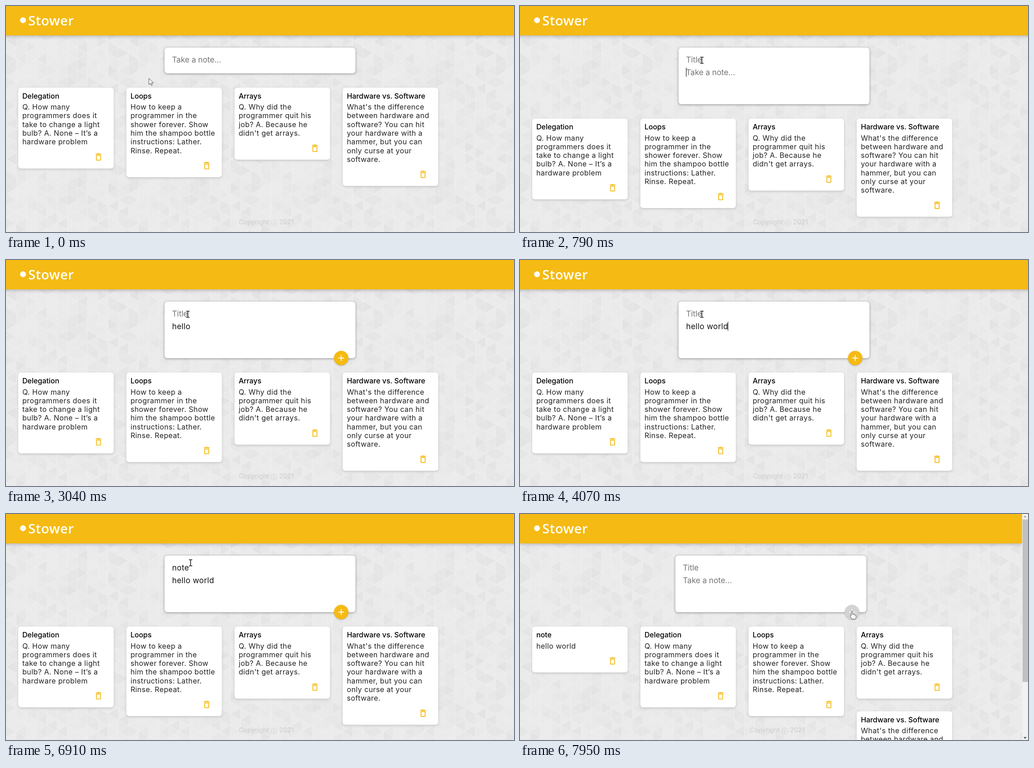
Recreate the animation shown at these times as an HTML page. Size 1120 by 500 pixels, loop 8000 ms.

```html
<!DOCTYPE html>
<html lang="en">
<head>
<meta charset="utf-8">
<title>Notes</title>
<style>
  html, body { margin: 0; width: 100%; height: 100%; overflow: hidden; background: #e9e9e9; }
  svg { display: block; width: 1120px; height: 500px; }
  text { font: 400 16px Inter, "Open Sans", sans-serif; letter-spacing: .025em; fill: #222; white-space: pre; }
  .brand { font: 600 29px "Open Sans", "Noto Sans", sans-serif; letter-spacing: .02em; fill: #fff; }
  .title { font-weight: 500; font-size: 15.9px; letter-spacing: 0; fill: #000; }
  .field { font-size: 17.3px; letter-spacing: .015em; fill: #111; }
  .hint { fill: #757575; letter-spacing: -.005em; }
  .foot { font-size: 14px; letter-spacing: .01em; fill: #ccc; text-anchor: middle; }
  .card { fill: #fff; filter: drop-shadow(0 2px 2.5px #c4c4c4); }
  .form { fill: #fff; filter: drop-shadow(0 1px 2.5px rgb(138, 137, 137)); }
  .bar { fill: #f5ba13; filter: drop-shadow(0 1px 4px rgba(0, 0, 0, .3)); }
</style>
</head>
<body>
<svg id="stage" viewBox="0 0 1120 500"></svg>
<script>
const LOOP = 8000, OPEN = 780, PRESS = 7790, ADD = 7950, BLINK = 530;
const GOLD = [245, 186, 19], GREY = [211, 211, 211];

const stage = document.getElementById('stage');
function el(tag, attrs, parent = stage, text) {
  const node = document.createElementNS('http://www.w3.org/2000/svg', tag);
  for (const key in attrs) node.setAttribute(key, attrs[key]);
  if (text) node.textContent = text;
  return parent.appendChild(node);
}
const show = (node, on) => { node.style.display = on ? '' : 'none'; };
const move = (node, x, y, scale = 1) =>
  node.setAttribute('transform', `translate(${x} ${y}) scale(${scale})`);
const progress = (t, from, to) => Math.min(1, Math.max(0, (t - from) / (to - from)));
const ease = u => u * u * (3 - 2 * u);

// Wallpaper of triangles with upright edges, one repeating tile
function wallpaper() {
  const side = 26, run = 22.5, cols = 12, rows = 10;
  const tile = el('pattern', {
    id: 'paper', width: run * cols, height: side * rows, patternUnits: 'userSpaceOnUse'
  }, el('defs', {}));
  const noise = (c, r, d) => {
    const n = Math.sin(c * 12.9 + r * 78.2 + d * 37.7) * 43758.5;
    return n - Math.floor(n);
  };
  for (let c = 0; c < cols; c++) {
    for (let r = -1; r <= rows; r++) {
      const x = c * run, y = r * side + (c % 2) * side / 2;
      for (const left of [0, 1]) {
        const shade = Math.round(235 - 8 * noise(c, (r + rows) % rows, left) ** 2);
        const points = left
          ? [x, y, x + run, y + side / 2, x + run, y - side / 2]
          : [x, y, x, y + side, x + run, y + side / 2];
        el('polygon', {
          points: points.join(' '), fill: `rgb(${shade},${shade},${shade})`,
          stroke: '#f2f2f2', 'stroke-width': .7, 'stroke-opacity': .6
        }, tile);
      }
    }
  }
  el('rect', { width: 1120, height: 500, fill: 'url(#paper)' });
}

const TRASH = 'M6 19c0 1.1.9 2 2 2h8c1.1 0 2-.9 2-2V7H6v12zM8 9h8v10H8V9z' +
  'm7.5-5l-1-1h-5l-1 1H5v2h14V4h-3.5z';

function makeCard([title, ...lines]) {
  const card = el('g', {});
  const height = 101.5 + 19.3 * (lines.length - 1);
  el('rect', { class: 'card', width: 210.5, height, rx: 6 }, card);
  el('text', { class: 'title', x: 9, y: 24 }, card, title);
  lines.forEach((line, i) => el('text', { x: 9, y: 48.5 + 19.3 * i }, card, line));
  el('path', {
    d: TRASH, fill: '#f5ba13', transform: `translate(166.3 ${height - 36.3}) scale(.9)`
  }, card);
  return card;
}

wallpaper();
const footer = el('text', { class: 'foot', y: 483 }, stage, 'Copyright ⓒ 2021');

const header = el('rect', { class: 'bar', y: -10, height: 75 });
el('circle', { cx: 37.5, cy: 31.5, r: 6.5, fill: '#fff' });
el('text', { class: 'brand', x: 49, y: 43 }, stage, 'Stower');

const cards = [
  ['note', 'hello world'],
  ['Delegation', 'Q. How many', 'programmers does it', 'take to change a light',
    'bulb? A. None – It’s a', 'hardware problem'],
  ['Loops', 'How to keep a', 'programmer in the', 'shower forever. Show',
    'him the shampoo bottle', 'instructions: Lather.', 'Rinse. Repeat.'],
  ['Arrays', 'Q. Why did the', 'programmer quit his', 'job? A. Because he', "didn't get arrays."],
  ['Hardware vs. Software', "What's the difference", 'between hardware and', 'software? You can hit',
    'your hardware with a', 'hammer, but you can', 'only curse at your', 'software.']
].map(makeCard);

const form = el('g', {});
const formBox = el('rect', { class: 'form', x: 349.5, y: 92, width: 421, rx: 6.5 }, form);

function makeField(hint, value, times) {
  return {
    value, times,
    hint: el('text', { class: 'field hint', x: 366 }, form, hint),
    text: el('text', { class: 'field', x: 366.3 }, form)
  };
}
const titleField = makeField('Title', 'note', [6030, 6140, 6260, 6370]);
const noteField = makeField('Take a note...', 'hello world',
  [1930, 2030, 2170, 2340, 2510, 3140, 3440, 3570, 3770, 3900, 4070]);
const caret = el('rect', { width: 1, height: 20, fill: '#000' }, form);

const button = el('g', {}, form);
const disc = el('circle', { r: 16 }, button);
el('path', { d: 'M-6.3 0H6.3M0-6.3V6.3', stroke: '#fff', 'stroke-width': 1.8 }, button);

const scrollbar = el('g', {});
el('rect', { x: 1107, width: 13, height: 500, fill: '#f1f1f1' }, scrollbar);
el('rect', { x: 1108, y: 12, width: 12, height: 359.5, fill: '#c1c1c1' }, scrollbar);
el('path', { d: 'M1110 7.5l3.5-4 3.5 4z', fill: '#a3a3a3' }, scrollbar);
el('path', { d: 'M1110 493.5l3.5 4 3.5-4z', fill: '#505050' }, scrollbar);

const outline = { fill: '#fff', stroke: '#222', 'stroke-width': .8, 'stroke-linejoin': 'round' };
const pointers = {
  arrow: el('path', { ...outline, d: 'M0 0V14l3.3-3 2.2 5 2.2-1-2.1-4.8h4.6z' }),
  beam: el('path', {
    d: 'M-3.5-6.7H-1L0-6 1-6.7H3.5M0-6V6M-3.5 6.7H-1L0 6 1 6.7H3.5',
    fill: 'none', stroke: '#000', 'stroke-width': 1.4
  }),
  hand: el('path', {
    ...outline,
    d: 'M-1.4 9V1.2a1.4 1.4 0 0 1 2.8 0V7q2.6-.9 2.8.9 2.4-.7 2.6 1 2-.4 2 1.4v3.5' +
      'q0 2-1.2 3.7H.2q-2.2-3.6-4.2-5.6-1-1.8.6-2.2z'
  })
};

// time, x, y
const route = [
  [150, 315, 160], [610, 401, 120], [4530, 401, 120], [4630, 391, 110], [4830, 391, 110],
  [4900, 394, 106], [5000, 399, 113], [5160, 391, 114], [5280, 391, 114], [5310, 404, 107],
  [6880, 404, 107], [6910, 407, 108], [7450, 732, 215]
];

function pointerAt(t) {
  const next = route.findIndex(stop => stop[0] > t);
  if (next === 0) return route[0].slice(1);
  if (next < 0) return route[route.length - 1].slice(1);
  const [t0, x0, y0] = route[next - 1], [t1, x1, y1] = route[next];
  const u = ease(progress(t, t0, t1));
  return [x0 + (x1 - x0) * u, y0 + (y1 - y0) * u];
}

function drawPointer(t, open) {
  const [x, y] = pointerAt(t);
  const inText = x > 360 && x < 760 && y > 100 && y < (open ? 195 : 134);
  const kind = Math.hypot(x - 739, y - 217) < 16 ? 'hand' : inText ? 'beam' : 'arrow';
  for (const name in pointers) show(pointers[name], name === kind);
  move(pointers[kind], x, y);
}

function drawField(field, baseline, t, visible) {
  const typed = t < ADD ? field.times.filter(time => time <= t).length : 0;
  const value = field.value.slice(0, typed);
  if (field.text.textContent !== value) field.text.textContent = value;
  field.text.setAttribute('y', baseline);
  field.hint.setAttribute('y', baseline);
  show(field.text, visible && typed);
  show(field.hint, visible && !typed);
}

function drawCaret(t, open) {
  const inTitle = t >= 5160;
  const field = inTitle ? titleField : noteField;
  const since = Math.max(inTitle ? 5160 : 715, ...field.times.filter(time => time <= t));
  const on = t >= 715 && t < PRESS && Math.floor((t - since) / BLINK) % 2 === 0;
  show(caret, on);
  if (!on) return;
  const width = field.text.textContent ? field.text.getComputedTextLength() : 0;
  caret.setAttribute('x', 366 + Math.round(width));
  caret.setAttribute('y', inTitle || !open ? 108.5 : 136.5);
}

function drawButton(t) {
  const scale = ease(progress(t, OPEN + 10, 1010));
  const hover = ease(progress(t, 7350, 7590));
  const press = t < ADD ? ease(progress(t, PRESS, 7920)) : 0;
  show(button, scale > 0);
  move(button, 739, 217, scale);
  disc.setAttribute('fill', `rgb(${GOLD.map((c, i) => Math.round(c + (GREY[i] - c) * hover))})`);
  disc.style.filter =
    `drop-shadow(0 ${1 + 5 * press}px ${1.5 + 4.5 * press}px rgba(0,0,0,${.25 + .1 * press}))`;
}

function draw(t) {
  const open = t >= OPEN, added = t >= ADD;
  cards.forEach((card, i) => {
    const slot = added ? Math.min(i, 3) : i - 1;
    const top = added && i === 4 ? 436.5 : open ? 249 : 180.7;
    move(card, 26.9 + 238.5 * slot, top);
  });
  show(cards[0], added);
  show(scrollbar, added);
  header.setAttribute('x', added ? 0 : -10);
  header.setAttribute('width', added ? 1107 : 1140);
  footer.setAttribute('x', added ? 567 : 574);
  move(form, added ? -7 : 0, 0);
  formBox.setAttribute('height', open ? 125.3 : 57);
  drawField(titleField, 125, t, open);
  drawField(noteField, open ? 152.5 : 125, t, true);
  drawCaret(t, open);
  drawButton(t);
  drawPointer(t, open);
}

const start = performance.now();
function tick() {
  draw((performance.now() - start) % LOOP);
  requestAnimationFrame(tick);
}
tick();
</script>
</body>
</html>
```
